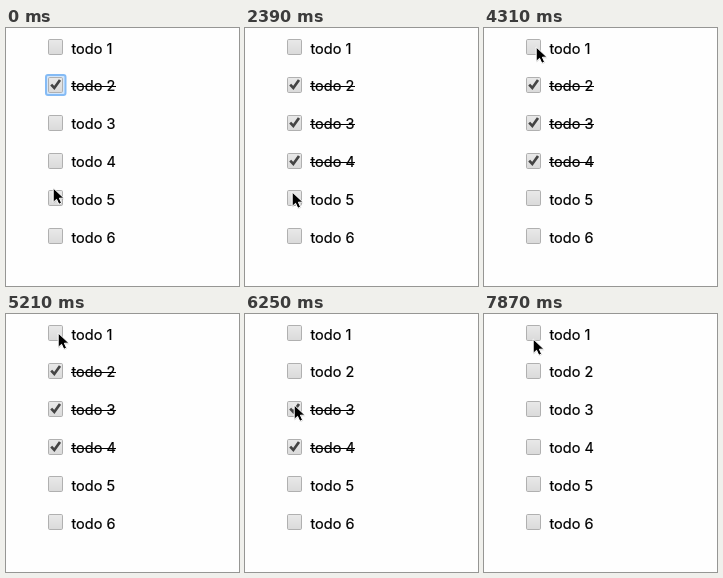
Animation of 233 by 258 pixels, one loop 8 s. Source, as an HTML page:

```html
<!DOCTYPE html>
<html lang="en">
<head>
<meta charset="utf-8">
<title>Todo list</title>
<style>
html, body { margin: 0; width: 100%; height: 100%; overflow: hidden; background: #fefefe; }
svg { display: block; width: 233px; height: 258px; }
text { font: 14.5px Inter, "Liberation Sans", sans-serif; fill: #000; stroke: #000; stroke-width: .2; }
.box { fill: url(#face); stroke: #b0b0b0; }
.tick { fill: none; stroke: #444; stroke-width: 2.7; }
.ring { fill: #d3e7fc; stroke: #85bbf5; stroke-width: 2; }
.on { visibility: hidden; }
.checked .on { visibility: visible; }
</style>
</head>
<body>
<svg viewBox="0 0 233 258">
  <defs>
    <linearGradient id="face" x2="0" y2="1">
      <stop offset="0" stop-color="#e9e9e9"/>
      <stop offset="1" stop-color="#dadada"/>
    </linearGradient>
  </defs>
  <rect id="ring" class="ring" x="40" y="47" width="19.5" height="20" rx="2"/>
  <g id="list"></g>
  <g id="cursor">
    <path d="M1.5 2V16.5L5 13.3L7.4 18L10.3 16.7L8 12.2H12.5Z" opacity=".16"/>
    <path d="M1.2 1V15.4L4.6 12.3L6.8 17.3L9.6 16.1L7.4 11.2H12Z" stroke="#fff"/>
  </g>
</svg>
<script>
const LOOP = 8000, STEP = 148.4, PITCH = 37.8, ROWS = 6;

// The pointer glides evenly to each stop between two steps.
const glides = [
  { from: 0, to: 1, x: 46, y: 163 },
  { from: 17, to: 19, x: 46, y: 145 },
  { from: 22, to: 29, x: 51, y: 18 },
  { from: 35, to: 39, x: 51, y: 54 },
  { from: 40, to: 42, x: 48, y: 90 },
  { from: 45, to: 46, x: 49, y: 127 },
  { from: 49, to: 53, x: 48, y: 24 }
];
const home = { x: 46, y: 159 };

// When each row is checked, in ms.
const blurAt = 440;
const checked = [
  [4610, 5210], [0, 5950], [blurAt, 6690], [blurAt, 7130], [blurAt, 2390]
];

const $ = id => document.getElementById(id);

function rowMarkup(i) {
  const y = Math.floor(19.6 + PITCH * i);
  const base = Math.round(25.6 + PITCH * i);
  return `<g>
    <rect class="box" x="42.5" y="${y - 7.5}" width="14" height="15" rx="1.2"/>
    <path class="tick on" d="M45.2 ${y - .3}L48.3 ${y + 3}L54 ${y - 5}"/>
    <text x="65.5" y="${base}">todo ${i + 1}</text>
    <rect class="on" x="65" y="${base - 5}" width="${i ? 45 : 42}" height="1"/>
  </g>`;
}

$('list').innerHTML = Array.from({ length: ROWS }, (_, i) => rowMarkup(i)).join('');
const rows = [...$('list').children];

function pointerAt(step) {
  let { x, y } = home;
  for (const g of glides) {
    const p = Math.min(1, Math.max(0, (step - g.from) / (g.to - g.from)));
    x += (g.x - x) * p;
    y += (g.y - y) * p;
  }
  return [x, y].map(Math.round);
}

function draw(t) {
  const [x, y] = pointerAt(Math.floor(t / STEP));
  $('cursor').setAttribute('transform', `translate(${x} ${y})`);
  $('ring').style.display = t < blurAt ? '' : 'none';
  checked.forEach(([from, to], i) =>
    rows[i].classList.toggle('checked', t >= from && t < to));
}

const start = performance.now();
function tick() {
  draw((performance.now() - start) % LOOP);
  requestAnimationFrame(tick);
}
tick();
</script>
</body>
</html>
```
